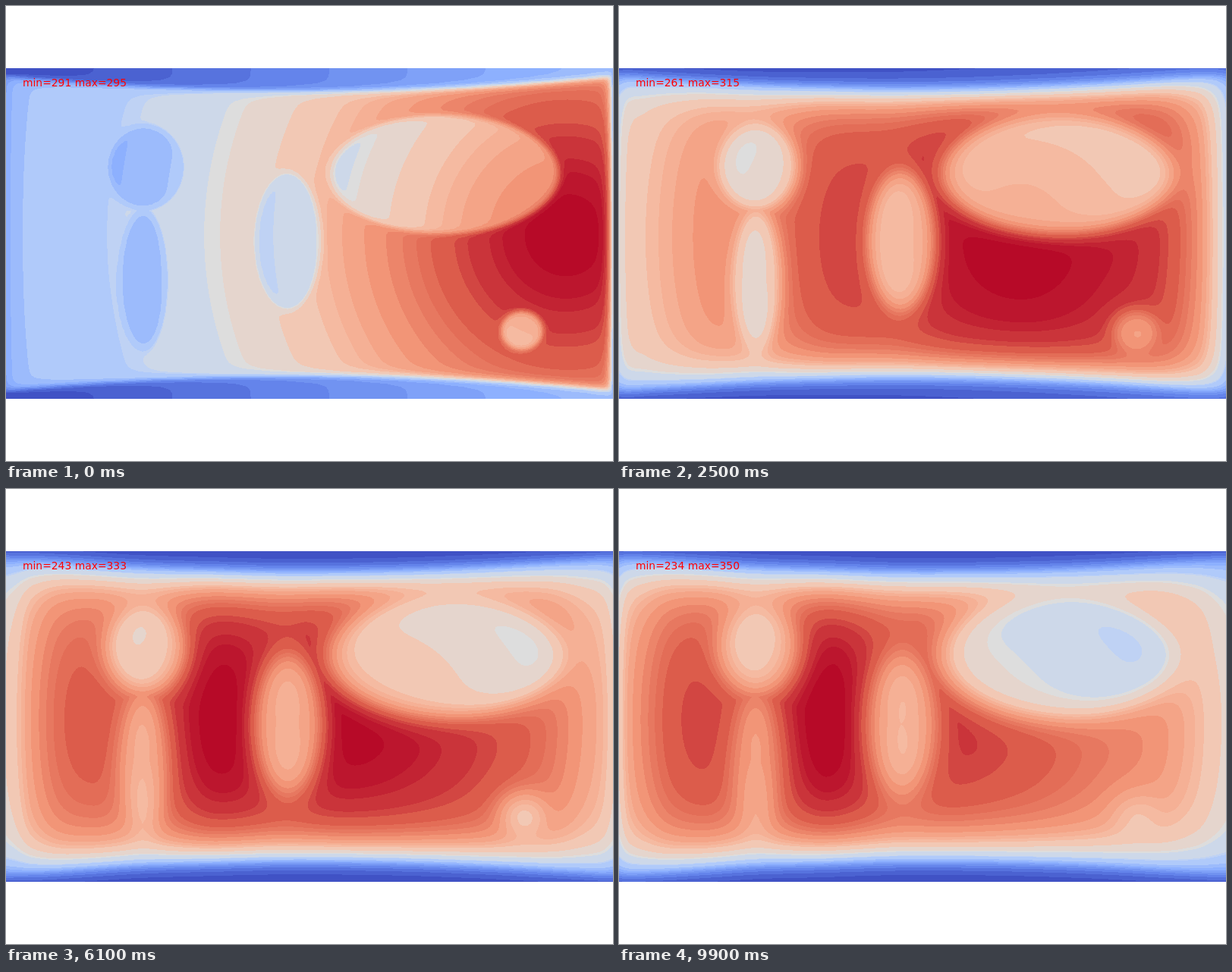
Animation, 800 px wide and 600 px high, one loop 10 s. Source, as an HTML page with a canvas:

```html
<!DOCTYPE html>
<html lang="en">
<head>
<meta charset="utf-8">
<title>Heat map</title>
<style>
  html, body { margin: 0; width: 100%; height: 100%; overflow: hidden; background: #fff; }
  #stage { position: relative; width: 800px; height: 600px; overflow: hidden; }
  canvas { position: absolute; left: 0; top: 82px; }
  svg { position: absolute; left: 0; top: 0; }
  text { font: 13.89px "DejaVu Sans", sans-serif; fill: #f00; white-space: pre; }
</style>
</head>
<body>
<div id="stage">
  <canvas id="map" width="800" height="436"></canvas>
  <svg width="800" height="600"><text id="label" x="22" y="106"></text></svg>
</div>
<script>
const W = 800, H = 436, TOP = 82, CELL = 4;
const COLS = W / CELL + 1, ROWS = H / CELL + 1;
const LOOP = 10000, STEP = 100;

// Cool-to-warm colours at equal distances
const STOPS = [[59, 76, 192], [98, 130, 234], [141, 176, 254], [184, 208, 249], [221, 221, 221],
  [245, 196, 173], [244, 154, 123], [222, 96, 77], [180, 4, 38]];

// Lower bound of each contour band
const LEVELS = [0, .03, .07, .11, .15, .19, .23, .27, .315, .39, .405, .49, .51, .575, .64, .67,
  .70, .74, .78, .81, .835, .86, .90, .92, .95, .965, .985, 1];

// Insulating ellipses: centre and radii
const ORGANS = [[184, 213, 50, 54], [182, 360, 30, 89], [372, 310, 43, 89],
  [578, 222, 150, 78], [680, 428, 27, 25]];

// seconds, min, max, vertical falloff, wall value left, wall rise, spot weight, organ depths
const STATES = [
  [0,   291, 295, .06, -.015, .31, 1, .13, .13, .18, .21, .24],
  [1.7, 266, 316, .06, -.02,  .12, 0, .25, .21, .21, .27, .22],
  [2.5, 261, 315, .08, -.025, .06, 0, .27, .25, .28, .32, .18],
  [3.9, 252, 327, .16, -.035, 0,   0, .29, .25, .29, .30, .10],
  [6.1, 243, 333, .12, -.04,  0,   0, .28, .20, .30, .36, .20],
  [7.3, 239, 340, .10, -.04,  .02, 0, .26, .18, .31, .39, .20],
  [8.5, 236, 346, .10, -.045, .02, 0, .24, .16, .31, .41, .14],
  [9.9, 234, 350, .12, -.045, 0,   0, .28, .18, .28, .39, .10]
];

// Heat along the middle line, one row per state after the first
const XS = [0, 12, 35, 70, 115, 180, 270, 360, 450, 540, 630, 710, 760, 785, 800];
const PROFILES = [
  [.49, .465, .45, .47, .51, .58, .70, .78, .88, .955, 1, .99, .88, .62, .42],
  [.50, .60, .64, .70, .76, .80, .905, .93, .985, 1, .975, .925, .79, .62, .45],
  [.52, .74, .90, .945, 1, .99, 1, .93, .875, .82, .755, .67, .55, .46, .44],
  [.585, .63, .75, .85, .885, .885, 1, .985, 1, .975, .92, .84, .74, .68, .60],
  [.56, .58, .64, .72, .77, .78, .91, .93, .975, 1, 1, .96, .86, .74, .60],
  [.575, .60, .64, .715, .765, .765, .91, .94, .985, 1, .965, .905, .79, .67, .57],
  [.59, .71, .80, .885, .92, .91, 1.01, .95, .935, .895, .83, .765, .67, .60, .56]
];
PROFILES.unshift(PROFILES[0]);

const lerp = (a, b, f) => a + (b - a) * f;
const mix = (a, b, f) => a.map((v, i) => lerp(v, b[i], f));
const clamp = v => Math.max(0, Math.min(1, v));

function coolwarm(v) {
  const i = Math.min(7, Math.floor(v * 8));
  return mix(STOPS[i], STOPS[i + 1], v * 8 - i);
}

const SHADES = 2000;
const shade = new Uint32Array(SHADES + 1);
for (let i = 0; i <= SHADES; i++) {
  let n = 0;
  while (n < LEVELS.length - 2 && LEVELS[n + 1] <= i / SHADES) n++;
  const [r, g, b] = coolwarm((LEVELS[n] + LEVELS[n + 1]) / 2).map(Math.round);
  shade[i] = (255 << 24 | b << 16 | g << 8 | r) >>> 0;
}

// Smooth curve through the profile points
function curve(p, x) {
  const last = XS.length - 1;
  let i = 0;
  while (i < last - 1 && XS[i + 1] < x) i++;
  const slope = k => {
    const a = Math.max(0, k - 1), b = Math.min(last, k + 1);
    return (p[b] - p[a]) / (XS[b] - XS[a]);
  };
  const h = XS[i + 1] - XS[i], f = (x - XS[i]) / h, g = 1 - f;
  return p[i] * (1 + 2 * f) * g * g + p[i + 1] * f * f * (3 - 2 * f)
    + h * f * g * (slope(i) * g - slope(i + 1) * f);
}

// Approximate signed depth inside an ellipse
function depthIn([cx, cy, rx, ry], x, y) {
  const nx = (x - cx) / rx, ny = (y - cy) / ry;
  const rho = Math.hypot(nx, ny) || 1e-6, small = Math.min(rx, ry);
  const scale = lerp(Math.sqrt(small * rx), Math.sqrt(small * ry), (ny / rho) ** 2);
  return (1 - rho) * scale;
}

// Heat of the first moment: one round spot near the right side
function spotHeat(x, y) {
  const r2 = (x - 738) ** 2 + (y - 302) ** 2;
  return .1 + .9 / (1 + r2 / 417 ** 2) - .08 * Math.exp(-x / 12) - .55 * Math.exp((x - W) / 4);
}

const nodes = [];
for (let j = 0; j < ROWS; j++) {
  for (let i = 0; i < COLS; i++) {
    const x = i * CELL, y = TOP + j * CELL;
    const edge = 112 - 20 * ((x - 400) / 400) ** 2;
    nodes.push({
      wall: Math.min(y - edge, 600 - edge - y),
      lift: ((y - 305) / 200) ** 2,
      spot: spotHeat(x, y),
      depths: ORGANS.map(o => depthIn(o, x, y))
    });
  }
}

const field = new Float32Array(COLS * ROWS);

function stateAt(t) {
  let i = 0;
  while (i < STATES.length - 2 && STATES[i + 1][0] <= t) i++;
  const a = STATES[i][0], b = STATES[i + 1][0];
  let f = clamp((t - a) / (b - a));
  if (i === 0) f = f ** .7;
  return { row: mix(STATES[i], STATES[i + 1], f), profile: mix(PROFILES[i], PROFILES[i + 1], f) };
}

function fillField(t, row, profile) {
  const [, , , fall, wallLeft, wallRise, spot, ...cuts] = row;
  const spread = (t / 2.5) ** .3;
  const outer = 3 + 7 * spread, inner = 4 + 14 * spread;
  const soft = 2 + 4.5 * Math.sqrt(t / 2.5);
  const line = Array.from({ length: COLS }, (_, i) => curve(profile, i * CELL));

  nodes.forEach((n, k) => {
    const i = k % COLS;
    let heat = lerp(line[i] * (1 - fall * n.lift), n.spot, spot);
    let cut = 0;
    for (let o = 0; o < cuts.length; o++) {
      cut = Math.max(cut, cuts[o] / (1 + Math.exp(-n.depths[o] / soft)));
    }
    heat -= cut;
    const wall = wallLeft + wallRise * i / (COLS - 1);
    const share = n.wall < 0 ? .4 * Math.exp(n.wall / outer) : 1 - .6 * Math.exp(-n.wall / inner);
    field[k] = lerp(wall, heat, share);
  });
}

const ctx = document.getElementById("map").getContext("2d");
const image = ctx.createImageData(W, H);
const pixels = new Uint32Array(image.data.buffer);
const label = document.getElementById("label");

function paint() {
  for (let y = 0; y < H; y++) {
    const j = Math.floor(y / CELL), fy = (y + .5) / CELL - j;
    for (let i = 0; i < COLS - 1; i++) {
      const k = j * COLS + i;
      const left = lerp(field[k], field[k + COLS], fy);
      const right = lerp(field[k + 1], field[k + COLS + 1], fy);
      for (let s = 0; s < CELL; s++) {
        const v = clamp(lerp(left, right, (s + .5) / CELL));
        pixels[y * W + i * CELL + s] = shade[Math.floor(v * SHADES)];
      }
    }
  }
  ctx.putImageData(image, 0, 0);
}

let shown = -1;
function draw(now) {
  const step = Math.floor((now % LOOP) / STEP);
  if (step !== shown) {
    shown = step;
    const t = step * STEP / 1000, { row, profile } = stateAt(t);
    fillField(t, row, profile);
    paint();
    label.textContent = `min=${Math.round(row[1])} max=${Math.round(row[2])}`;
  }
}

const start = performance.now();
function tick() {
  draw(performance.now() - start);
  requestAnimationFrame(tick);
}
tick();
</script>
</body>
</html>
```
